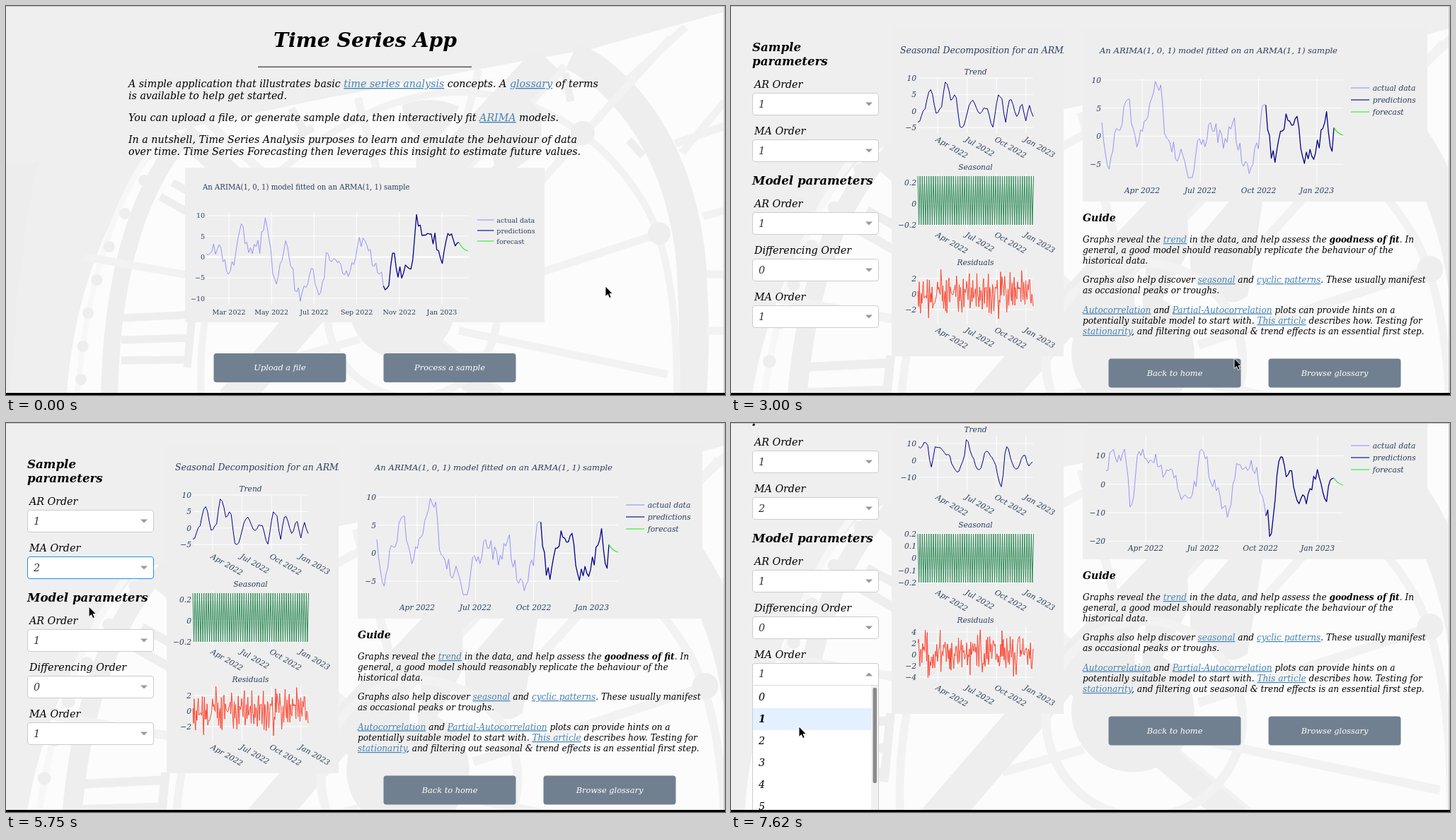
Recreate the animation shown at these times as an HTML page. Size 1016 by 551 pixels, loop 8000 ms.

```html
<!DOCTYPE html>
<html lang="en">
<head>
<meta charset="utf-8">
<title>Time Series App</title>
<style>
  html, body { margin: 0; width: 100%; height: 100%; overflow: hidden; background: #fcfcfc; }
  svg { display: block; width: 1016px; height: 551px; font: italic 14.24px "DejaVu Serif", serif; }
  .b { font-weight: bold; }
  .up { font-style: normal; }
  .axis { fill: #2a3f5f; }
  .link { fill: #4682b4; text-decoration: underline; }
  .status { font: 12.3px "Noto Sans", sans-serif; fill: #444; }
  .ln { fill: none; stroke-linejoin: round; }
</style>
</head>
<body>
<svg id="stage" viewBox="0 0 1016 551"></svg>
<script>
const rect = (x, y, w, h, fill, extra = '') =>
  `<rect x="${x}" y="${y}" width="${w}" height="${h}" fill="${fill}" ${extra}/>`;
const text = (x, y, s, size = 14.24, extra = '') =>
  `<text x="${x}" y="${y}" font-size="${size}" ${extra}>${s}</text>`;
const stroke = (d, color, width) => `<path class="ln" d="${d}" stroke="${color}" stroke-width="${width}"/>`;
const disc = (x, y, r, fill) => `<circle cx="${x}" cy="${y}" r="${r}" fill="${fill}"/>`;
const group = (id, body) => `<g id="${id}">${body}</g>`;
const link = s => `<tspan class="link">${s}</tspan>`;
const END = 'text-anchor="end"', MID = 'text-anchor="middle"';
const ACTUAL = '#9494fa', PREDICTED = '#00008b', FORECAST = '#2bf02b';

const ease = p => (1 - Math.cos(Math.PI * p)) / 2;

// Eased value between [position, value] keys; stays flat outside them
function between(keys, at) {
  const i = keys.findIndex(k => k[0] >= at);
  if (i < 0) return keys.at(-1)[1];
  if (i === 0) return keys[0][1];
  const [a, from] = keys[i - 1], [b, to] = keys[i];
  return from + (to - from) * ease((at - a) / (b - a));
}

// Seeded noise in -1..1
function noise(seed) {
  return () => (seed = (seed * 16807) % 2147483647) / 1073741823.5 - 1;
}

const steps = (x0, x1, count, height) => Array.from({ length: count + 1 }, (_, i) =>
  [x0 + (x1 - x0) * i / count, height(i)]);
const line = (points, color, width) =>
  stroke('M' + points.map(([x, y]) => `${x.toFixed(1)},${y.toFixed(1)}`).join('L'), color, width);

// A rough walk through the keys
function walk(keys, seed, rough, step = 2.6) {
  const next = noise(seed), x0 = keys[0][0], x1 = keys.at(-1)[0], count = Math.round((x1 - x0) / step);
  return steps(x0, x1, count, i => between(keys, x0 + (x1 - x0) * i / count) + rough * next());
}

function fitted(keys, seed, rough, split) {
  const points = walk(keys, seed, rough), cut = points.findIndex(p => p[0] >= split);
  const [x, y] = keys.at(-1);
  return line(points.slice(0, cut + 1), ACTUAL, 1) + line(points.slice(cut), PREDICTED, 1.3) +
    stroke(`M${points.at(-1)}Q${x + 5},${y + 7} ${x + 13},${y + 9}`, FORECAST, 1.2);
}

const grid = (x0, x1, y0, y1, xs, ys) => stroke(
  xs.map(x => `M${x},${y0}V${y1}`).join('') + ys.map(y => `M${x0},${y}H${x1}`).join(''), '#fff', 1);

const legend = (x, y, gap, size, cls) => ['actual data', 'predictions', 'forecast'].map((s, i) =>
  stroke(`M${x},${y + i * gap}h${size * 2.45}`, [ACTUAL, PREDICTED, FORECAST][i], 1.1) +
  text(x + size * 2.88, y + i * gap + 3.7, s, size, cls)).join('');

// Tick labels from top to bottom, `gap` pixels apart
const ticks = (x, y, gap, labels, size, cls) =>
  labels.map((s, i) => text(x, y + i * gap + size * .36, s, size, `${END} ${cls}`)).join('');

// ---- clock behind every page
function clock() {
  const dark = '#eee', mid = '#f2f2f2';
  let bolts = '';
  for (let y = 200; y < 540; y += 47) bolts += disc(106 + 121 * ((530 - y) / 330) ** 2, y, 8, dark);
  return rect(-100, 0, 1300, 560, '#fcfcfc') +
    `<path d="M-100,0H1200V-20L1016,8 830,60 600,102 430,135 290,165 235,178 C150,270 95,400 85,560H-100z" fill="#efefef"/>` +
    `<path d="M-100,232L45,222 C20,330 15,430 5,560H-100z" fill="#ededed"/>` +
    stroke('M215,190C140,290 112,420 100,560', '#f7f7f7', 8) + bolts +
    stroke('M250,185C180,270 148,400 146,560', dark, 24) +
    stroke('M800,70C900,120 968,250 970,400Q975,480 968,560', dark, 42) +
    stroke('M276,560C270,430 300,310 380,240C460,170 550,122 640,122C760,125 850,190 905,285Q950,370 948,560', mid, 10) +
    stroke('M497,130L542,300M668,90L645,180M940,45L700,310M925,322L640,415M640,460L935,522M110,355L430,412M400,500L500,472', mid, 11) +
    stroke('M878,105L960,30M955,208L1016,135M945,195L1100,140M985,298L1100,268M990,380H1100M990,460H1100', mid, 11) +
    stroke('M285,165L490,350M790,85L520,365M490,375L700,548', mid, 12) +
    stroke('M250,180L480,380 690,560', dark, 32) + stroke('M765,75L480,375 320,560', dark, 46) +
    `<path d="M560,140Q600,125 640,142Q630,170 605,190L625,205 628,300 590,370 575,340 580,215 585,185Q560,170 560,140z
      M735,130L757,150 756,205 720,230 700,355Q680,370 665,355L630,330 630,295 690,225 685,205 705,180z" fill="${dark}"/>` +
    disc(560, 425, 75, dark) + disc(815, 180, 17, dark) + disc(923, 322, 16, dark) + disc(296, 390, 13, dark) +
    stroke('M454,435a120,120 0 1 1 240,0a120,120 0 1 1 -240,0', mid, 11) + rect(562, 332, 10, 40, '#fcfcfc') +
    stroke('M235,250L318,296M218,270L302,318M322,282L298,330M163,442L264,437M163,473L262,470M163,502L258,501M264,428L256,512M403,145L424,182M410,186L434,172M790,95L798,135M880,190L900,212', dark, 11);
}

const button = (x, y, s) => rect(x, y, 187, 41, '#708090', 'rx="4"') +
  text(x + 93.5, y + 24, s, 11.39, MID + ' fill="#fff"');

// ---- home page
function homeChart() {
  const months = ['Mar 2022', 'May 2022', 'Jul 2022', 'Sep 2022', 'Nov 2022', 'Jan 2023'];
  const xs = months.map((_, i) => 315 + i * 60.2), ys = [297, 326, 355.5, 385, 414], cls = 'class="axis up"';
  const keys = [[283, 362], [299, 342], [318, 372], [332, 316], [346, 350], [357, 342], [367, 306], [382, 398], [394, 343],
    [416, 412], [431, 380], [443, 402], [456, 350], [482, 376], [507, 328], [526, 378], [537, 396], [548, 358], [556, 380],
    [572, 370], [581, 302], [591, 335], [604, 328], [614, 358], [628, 323], [640, 338]];
  return rect(253, 229, 508, 219, '#eee') +
    text(278, 260, 'An ARIMA(1, 0, 1) model fitted on an ARMA(1, 1) sample', 10.1, cls) +
    grid(283, 654, 292, 423, xs, ys) + stroke('M283,355.5H654', '#fff', 2) +
    ticks(281, 297, 29.3, ['10', '5', '0', '−5', '−10'], 9.5, cls) +
    xs.map((x, i) => text(x, 437, months[i], 9.5, `${MID} ${cls}`)).join('') +
    fitted(keys, 77, 11, 532) + legend(666, 303, 15, 9.5, cls);
}

const home = text(507.5, 58, 'Time Series App', 28.3, MID + ' class="b"') + rect(356, 85.5, 302, 1.6, '#605a60') +
  text(173, 115, `A simple application that illustrates basic ${link('time series analysis')} concepts. A ${link('glossary')} of terms`) +
  text(173, 132, 'is available to help get started.') +
  text(173, 163, `You can upload a file, or generate sample data, then interactively fit ${link('ARIMA')} models.`) +
  text(173, 194, 'In a nutshell, Time Series Analysis purposes to learn and emulate the behaviour of data') +
  text(173, 211, 'over time. Time Series Forecasting then leverages this insight to estimate future values.') +
  homeChart() + button(293.5, 492, 'Upload a file') + group('process', button(533.5, 492, 'Process a sample'));

// ---- sample page
const arrow = (y, up) => `<path d="M190,${y + (up ? 2.5 : -2.5)}h10l-5,${up ? -5 : 5}z" fill="#999"/>`;
const select = (y, value, id) => rect(30.5, y + .5, 178, 31, '#fff', `rx="3.5" stroke="#ccc" id="${id}Box"`) +
  text(39, y + 20.5, value, 14.24, `fill="#333" id="${id}"`) + arrow(y + 16);

const controls = text(30, 64, 'Sample', 16.66, 'class="b"') + text(30, 84, 'parameters', 16.66, 'class="b"') +
  text(30, 253, 'Model parameters', 16.66, 'class="b"') +
  [[116, 'AR Order', 1, 'ar'], [182, 'MA Order', 1, 'ma'], [285, 'AR Order', 1, 'modelAr'],
    [351, 'Differencing Order', 0, 'modelDiff'], [417, 'MA Order', 1, 'modelMa']]
    .map(([y, label, value, id]) => text(33, y, label) + select(y + 7, value, id)).join('');

const guide = text(497, 305, 'Guide', 14.16, 'class="b"') + [
  [335, `Graphs reveal the ${link('trend')} in the data, and help assess the <tspan class="b">goodness of fit</tspan>. In`],
  [350, 'general, a good model should reasonably replicate the behaviour of the'],
  [365, 'historical data.'],
  [392, `Graphs also help discover ${link('seasonal')} and ${link('cyclic patterns')}. These usually manifest`],
  [407, 'as occasional peaks or troughs.'],
  [434.5, `${link('Autocorrelation')} and ${link('Partial-Autocorrelation')} plots can provide hints on a`],
  [450, `potentially suitable model to start with. ${link('This article')} describes how. Testing for`],
  [465, `${link('stationarity')}, and filtering out seasonal &amp; trend effects is an essential first step.`]
].map(([y, s]) => text(497, y, s, 12.1)).join('');

const quarters = ['Apr 2022', 'Jul 2022', 'Oct 2022', 'Jan 2023'];
const AXIS = 'class="axis"';

function subplot(title, top, axis, points, color) {
  const xs = quarters.map((_, i) => 292 + i * 41.6);
  return text(345.5, top - 5, title, 10.68, `${MID} ${AXIS}`) +
    grid(264, 427, top, top + 78, xs, axis.labels.map((_, i) => axis.y + i * axis.gap)) +
    ticks(262, axis.y, axis.gap, axis.labels, 10.68, AXIS) +
    xs.map((x, i) => `<g transform="translate(${x - 3.5},${top + 89}) rotate(30)">${text(0, 0, quarters[i], 10.68, AXIS)}</g>`).join('') +
    line(points, color, 1);
}

function residuals(seed, centre) {
  const next = noise(seed);
  return steps(264, 427, 170, () => centre + 15 * (next() + next() + next()));
}

function charts(c) {
  const xs = quarters.map((_, i) => c.firstQuarter + i * c.quarter), { y, gap, labels } = c.axis;
  return text(239, 67, 'Seasonal Decomposition for an ARMA(1, 1) sample', 12.45, `${AXIS} clip-path="url(#left)"`) +
    subplot('Trend', 102, c.trendAxis, walk(c.trend, 5, 2.5), PREDICTED) +
    subplot('Seasonal', 237, c.seasonAxis, steps(264, 427.5, 104, i => i % 2 ? 310 : 241), '#2e8b57') +
    subplot('Residuals', 372, c.residualAxis, residuals(c.seed, c.centre), '#ff4530') +
    text(521, 67, `An ARIMA(1, 0, 1) model fitted on an ARMA(1, ${c.order}) sample`, 11.6, AXIS) +
    grid(c.keys[0][0], 865, 102, 251, xs, labels.map((_, i) => y + i * gap)) +
    ticks(c.keys[0][0] - 1, y, gap, labels, 10.68, AXIS) +
    xs.map((x, i) => text(x, 265, quarters[i], 10.68, `${MID} ${AXIS}`)).join('') +
    fitted(c.keys, c.seed, c.rough, 755) + legend(876, 116, 17, 10.68, AXIS);
}

const first = {
  order: 1, seed: 4711, rough: 14, centre: 408, firstQuarter: 581, quarter: 82.3,
  axis: { y: 105, gap: 39.7, labels: ['10', '5', '0', '−5'] },
  keys: [[524, 178], [533, 222], [546, 182], [560, 122], [571, 190], [586, 168], [599, 112], [607, 114], [615, 192], [636, 215],
    [649, 236], [660, 200], [681, 168], [695, 193], [710, 160], [719, 208], [733, 228], [744, 198], [752, 140], [766, 218],
    [784, 160], [792, 180], [802, 165], [808, 218], [822, 208], [842, 160], [848, 200], [852, 174]],
  trendAxis: { y: 102, gap: 23.4, labels: ['10', '5', '0', '−5'] },
  trend: [[264, 167], [272, 149], [282, 119], [291, 151], [297, 146], [303, 107], [312, 133], [317, 127], [325, 174], [342, 133],
    [350, 152], [362, 143], [369, 171], [378, 127], [384, 134], [387, 168], [394, 131], [404, 155], [411, 139], [417, 164], [421, 140], [427, 156]],
  seasonAxis: { y: 250.5, gap: 29.8, labels: ['0.2', '0', '−0.2'] },
  residualAxis: { y: 386, gap: 22, labels: ['2', '0', '−2'] }
};
const second = {
  order: 2, seed: 9021, rough: 10, centre: 411, firstQuarter: 586, quarter: 81,
  axis: { y: 130.5, gap: 40.3, labels: ['10', '0', '−10', '−20'] },
  keys: [[530, 160], [537, 124], [546, 142], [555, 118], [566, 204], [577, 118], [588, 142], [600, 138], [610, 155], [625, 160],
    [640, 196], [655, 174], [665, 112], [680, 165], [702, 210], [716, 142], [740, 147], [752, 196], [757, 208], [762, 241],
    [777, 130], [786, 162], [793, 160], [800, 190], [812, 193], [827, 158], [840, 190], [852, 163]],
  trendAxis: { y: 113, gap: 24, labels: ['10', '0', '−10'] },
  trend: [[265, 120], [276, 111], [283, 147], [289, 116], [306, 129], [319, 154], [328, 140], [333, 107], [340, 130], [350, 152],
    [362, 122], [371, 136], [382, 175], [389, 118], [402, 150], [415, 129], [420, 145], [426, 139]],
  seasonAxis: { y: 241, gap: 17.3, labels: ['0.2', '0.1', '0', '−0.1', '−0.2'] },
  residualAxis: { y: 380, gap: 16, labels: ['4', '2', '0', '−2', '−4'] }
};

const option = (y, n) => text(39, y, n, 14.24, n === 1 ? 'class="b"' : '');
const openList = (y, height, body) => rect(30.5, y + .5, 178, height, '#fff', 'rx="3.5" stroke="#ccc"') +
  stroke(`M31,${y + 31.5}H208`, '#ddd', 1) + text(39, y + 20, 1, 14.24, 'fill="#333"') + arrow(y + 16, true) + body;
const maMenu = openList(189, 157, rect(31, 221, 177, 31, '#e3f0ff', 'id="hot"') +
  [1, 2, 3, 4].map(n => option(211.4 + n * 30.8, n)).join(''));
const modelMenu = openList(424, 230, rect(31, 488, 167, 31, '#e3f0ff') +
  rect(198, 456, 10, 180, '#f0f0f0') + rect(200.5, 459, 5.5, 135, '#8b8b8b', 'rx="2"') +
  [0, 1, 2, 3, 4, 5].map(n => option(476.5 + n * 31.1, n)).join(''));

const app = controls + rect(227, 31, 243, 465, '#eee') + rect(497, 31, 487, 246, '#eee') +
  group('chartsA', charts(first)) + group('chartsB', charts(second)) + guide +
  button(533.5, 499.5, 'Back to home') + button(759.5, 499.5, 'Browse glossary') +
  group('maMenu', maMenu) + group('modelMenu', modelMenu);

const el = id => document.getElementById(id);
el('stage').innerHTML = `<defs><clipPath id="left">${rect(227, 31, 243, 465, '#000')}</clipPath></defs>` +
  group('back', clock()) + group('home', home) + group('loading', text(30, 45, 'Loading...')) + group('app', app) +
  group('status', rect(-5, 527.5, 10, 30, '#f4f4f4', 'id="statusBox" rx="4" stroke="#bbb"') +
    text(3, 543, '', 12.3, 'id="statusText" class="status"')) +
  group('edge', rect(1014, 0, 2, 551, '#c9c9c9')) +
  group('pointer', '<path d="M0,0V14.5L3.4,11.6 5.7,16.6 8.2,15.5 6,10.6H10.3z" fill="#000" stroke="#fff" stroke-width=".9"/>') +
  group('hand', '<path d="M-2,8V0Q-.5,-2 1,0V4L6,5Q7.5,5.5 7.5,7V10L6,13H-1L-5.5,8Q-5,5.5 -2,8z" fill="#111" stroke="#fff" stroke-width="1.2"/>') +
  rect(0, 0, 1016, 1, '#c4c4c4') + rect(0, 548, 1016, 3, '#000');

const show = (id, on) => el(id).style.display = on ? '' : 'none';
const move = (id, x, y) => el(id).setAttribute('transform', `translate(${x},${y})`);

// Pointer stops; times count eighths of a second
const pointerX = [[3, 847], [8, 711], [27, 711], [34, 113], [40, 113], [41, 117], [45, 118], [49, 112], [52, 112], [59, 96]];
const pointerY = [[3, 397], [8, 499], [27, 499], [34, 206], [40, 212], [41, 242], [43, 258], [49, 262], [52, 262], [59, 430]];

function draw() {
  const tick = Math.floor((performance.now() % 8000 + 5) / 125);
  const onHome = tick < 13, onApp = tick >= 22, scroll = tick >= 61 ? 84 : 0;
  show('home', onHome);
  show('loading', !onHome && !onApp);
  show('app', onApp);
  show('edge', onHome || onApp);
  el('back').setAttribute('transform', onApp ? `translate(-80,${-scroll}) scale(1.157)` : '');
  move('app', 0, -scroll);

  const hover = Math.max(0, Math.min(1, (tick - 8) / 2));
  const face = el('process').firstChild, shade = from => Math.round(from + (60 - from) * hover);
  move('process', 0, -7 * hover);
  face.setAttribute('fill', `rgb(${shade(112)},${shade(128)},${shade(144)})`);
  face.style.filter = hover ? `drop-shadow(${5 * hover}px ${8 * hover}px ${4 * hover}px rgba(0,0,0,.8))` : '';

  show('status', tick >= 11 && !onApp);
  el('statusBox').setAttribute('width', onHome ? 144.5 : 292);
  el('statusText').textContent = onHome ? '127.0.0.1:8080/sample' : '127.0.0.1';

  show('chartsA', tick >= 23 && tick < 48);
  show('chartsB', tick >= 48);
  show('maMenu', tick >= 35 && tick < 46);
  el('hot').setAttribute('y', tick >= 42 ? 252 : 221);
  el('ma').textContent = tick >= 46 ? 2 : 1;
  el('maBox').setAttribute('stroke', tick >= 46 && tick < 61 ? '#1890ff' : '#ccc');
  show('modelMenu', tick >= 61);

  const x = between(pointerX, tick), y = between(pointerY, tick), isHand = tick >= 9 && onHome;
  show('pointer', !isHand);
  show('hand', isHand);
  move('pointer', x, y);
  move('hand', x, y);
  requestAnimationFrame(draw);
}
draw();
</script>
</body>
</html>
```
